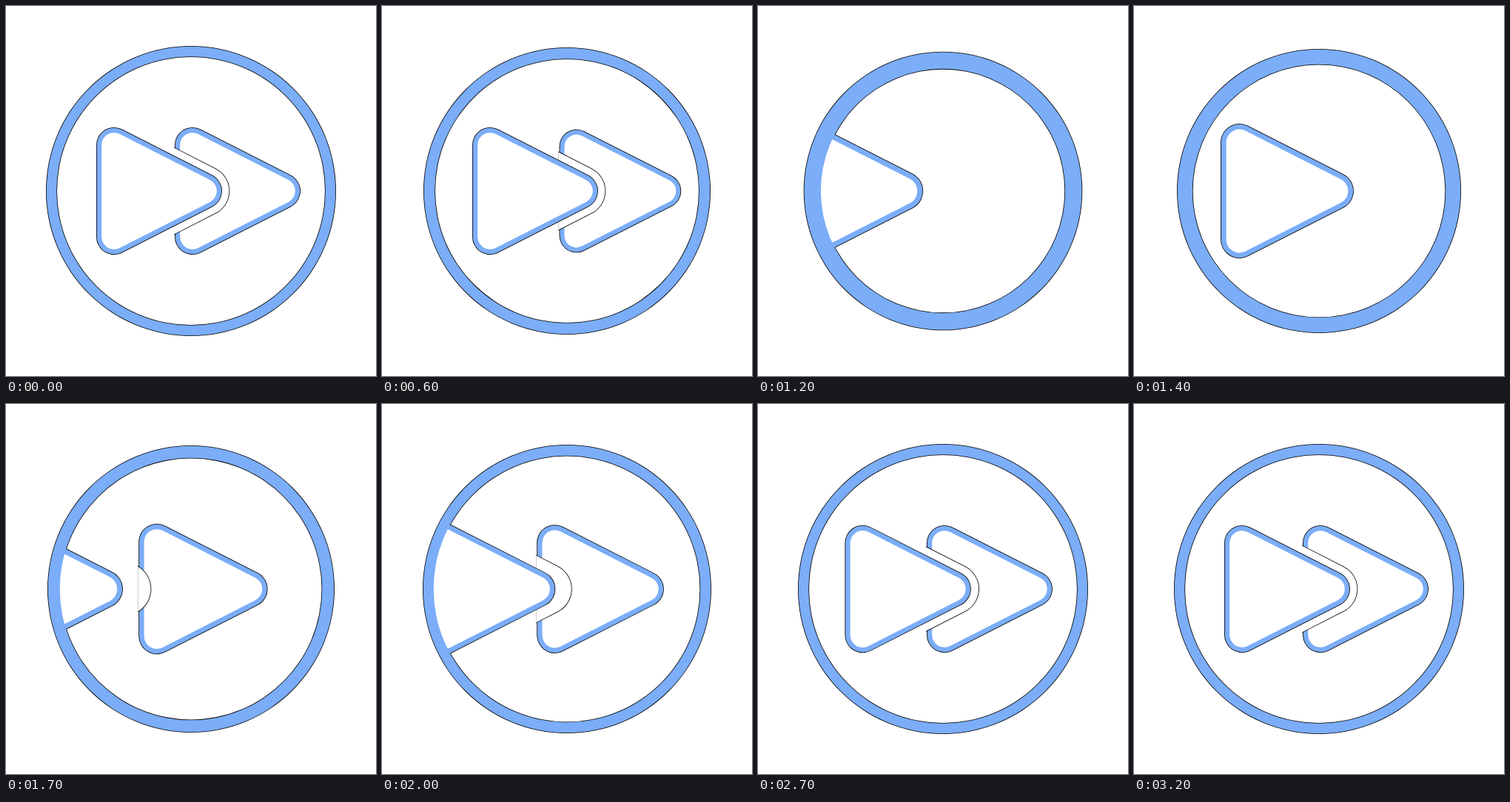
Animation of 500 by 500 pixels, one loop 3700 ms. Source, as an HTML page with a canvas:

```html
<!DOCTYPE html>
<html lang="en">
<head>
<meta charset="utf-8">
<title>Fast forward</title>
<style>
  html, body { margin: 0; width: 100%; height: 100%; overflow: hidden; background: #fff; }
  canvas { display: block; }
</style>
</head>
<body>
<canvas id="stage" width="500" height="500"></canvas>
<script>
const ctx = document.getElementById('stage').getContext('2d');
const BLUE = '#7badf8', BLACK = '#000', WHITE = '#fff';
const LOOP = 3700, STEP = 100, LAST = 27;
const MID = 250, LEFT_X = 207, RIGHT_X = 313;
const HAIR = 0.8, GAP = 10;
const NORMAL = Math.atan2(122, 62);

// Ring: how far the outer radius shrinks, and the band width, by step
const SHRINK = [[0, 0], [1, 2], [4, 11], [5, 12], [6, 9.5], [9, 4], [12, 2], [15, 1], [19, 0]];
const BAND = [[0, 15], [1, 16], [4, 20], [6, 23.5], [7, 24], [9, 21.6], [12, 17.5], [15, 15.5], [19, 15]];

function sample(keys, k) {
  for (let i = 1; i < keys.length; i++) {
    const [k0, v0] = keys[i - 1], [k1, v1] = keys[i];
    if (k <= k1) return v0 + (v1 - v0) * (k - k0) / (k1 - k0);
  }
  return keys[keys.length - 1][1];
}

// Speeds up to the right while shrinking
function leaving(home, t) {
  t = Math.max(0, t);
  return {
    x: home + 7.7 * t + 1.23 * t ** 3,
    s: Math.max(0.5, 1 - 0.03 * t - 0.001 * t ** 4),
    lead: 0
  };
}

// Slows down into place from the left, slightly enlarged
function arriving(home, left) {
  const u = Math.max(0, left);
  const d = 0.035 * u ** 3 + 2.5 * Math.max(0, u - 12) ** 2;
  return { x: home - d, s: 1 + 0.00055 * d, lead: 0.2 * d };
}

function arrowPath({ x, s }, grow) {
  const r = 24 * s + grow, dx = 61 * s, dy = 62 * s;
  ctx.beginPath();
  ctx.arc(x + dx, MID, r, -NORMAL, NORMAL);
  ctx.arc(x - dx, MID + dy, r, NORMAL, Math.PI);
  ctx.arc(x - dx, MID - dy, r, Math.PI, 2 * Math.PI - NORMAL);
  ctx.closePath();
}

function fillArrow(arrow, grow, color) {
  arrowPath(arrow, grow);
  ctx.fillStyle = color;
  ctx.fill();
}

function drawArrow(arrow) {
  fillArrow(arrow, 0, BLACK);
  fillArrow(arrow, -HAIR, BLUE);
  fillArrow(arrow, -7.2 * arrow.s, WHITE);
}

// The back arrow is cut by a wider copy of the front one
function drawPair(front, back) {
  drawArrow(back);
  ctx.save();
  arrowPath(back, 1);
  ctx.clip();
  const cut = { x: front.x + front.lead, s: front.s };
  fillArrow(cut, GAP + 0.3, BLACK);
  fillArrow(cut, GAP - 0.5, WHITE);
  ctx.restore();
  drawArrow(front);
}

function annulus(outer, inner, color) {
  ctx.beginPath();
  ctx.arc(MID, MID, outer, 0, 2 * Math.PI);
  ctx.arc(MID, MID, inner, 0, 2 * Math.PI, true);
  ctx.fillStyle = color;
  ctx.fill();
}

function draw(k) {
  const outer = 196 - sample(SHRINK, k);
  const inner = outer - sample(BAND, k);

  ctx.fillStyle = WHITE;
  ctx.fillRect(0, 0, 500, 500);
  annulus(outer, inner, BLACK);

  ctx.save();
  ctx.beginPath();
  ctx.arc(MID, MID, outer - 3, 0, 2 * Math.PI);
  ctx.clip();
  if (k < 9) drawPair(leaving(LEFT_X, k - 1), leaving(RIGHT_X, k));
  if (k > 4) drawPair(arriving(LEFT_X, 27 - k), arriving(RIGHT_X, 23 - k));
  ctx.restore();

  annulus(outer - HAIR, inner + HAIR, BLUE);
}

function tick() {
  const t = performance.now() % LOOP;
  draw(Math.min(LAST, Math.max(0, Math.floor(t / STEP) - 5)));
  requestAnimationFrame(tick);
}
tick();
</script>
</body>
</html>
```
